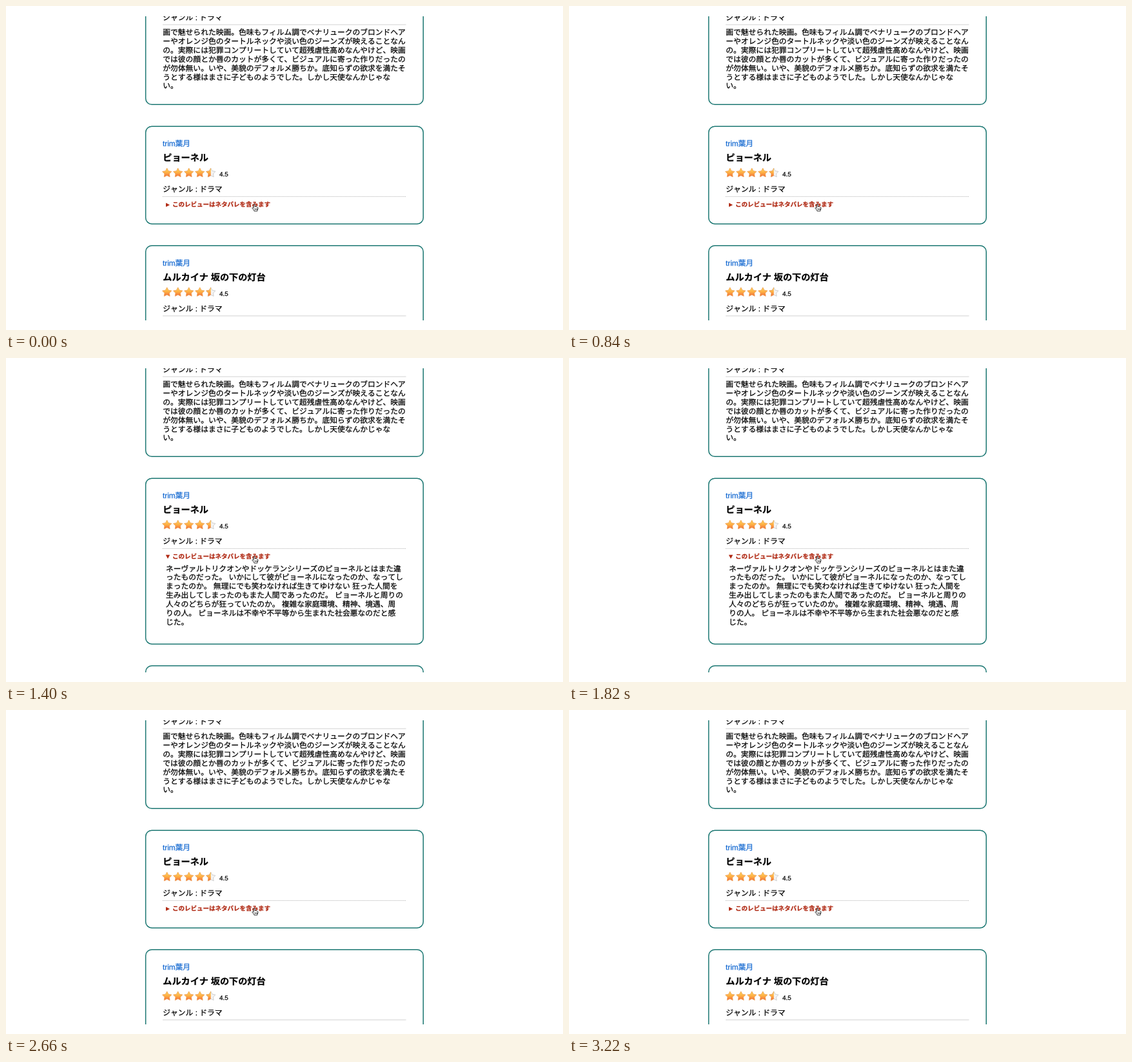
Write an HTML page that moves like this. It is 864 px wide and 504 px high and loops after 3360 ms.

```html
<!DOCTYPE html>
<html lang="ja">
<meta charset="utf-8">
<title>Review list</title>
<style>
  html, body { margin: 0; width: 100%; height: 100%; overflow: hidden; background: #fff; }
  svg { display: block; }
  text {
    font: 11.78px "Liberation Sans", "Noto Sans CJK JP", sans-serif;
    font-kerning: none; text-rendering: geometricPrecision; white-space: pre;
    color: #000; fill: currentColor; stroke: currentColor; stroke-width: .25;
  }
  .user { color: #1a6dd2; }
  .title { font-size: 14.13px; font-weight: 700; }
  .score { font-size: 9.8px; }
  .spoiler { font-size: 9.5px; font-weight: 700; color: #b02a14; }
  .frame { fill: #fff; stroke: #1b7772; stroke-width: 1.5; }
  .rule { stroke: #d2d2d2; }
  .dotted { stroke: #b4b4b4; stroke-dasharray: 1 1; }
</style>
<svg id="stage" width="864" height="504" viewBox="0 0 864 504"></svg>
<script>
const LINE = 13.83, STEP = 185.5, LOOP = 3360, OPEN = 1400, CLOSE = 2660, GROWTH = 106;
const CARD_HEIGHT = 151.6;

const firstReview = `画で魅せられた映画。色味もフィルム調でベナリュークのブロンドヘア
ーやオレンジ色のタートルネックや淡い色のジーンズが映えることなん
の。実際には犯罪コンプリートしていて超残虐性高めなんやけど、映画
では彼の顔とか唇のカットが多くて、ビジュアルに寄った作りだったの
が勿体無い。いや、美貌のデフォルメ勝ちか。底知らずの欲求を満たそ
うとする様はまさに子どものようでした。しかし天使なんかじゃな
い。`;
const hiddenReview = `ネーヴァルトリクオンやドッケランシリーズのピョーネルとはまた違
ったものだった。 いかにして彼がピョーネルになったのか、なってし
まったのか。 無理にでも笑わなければ生きてゆけない 狂った人間を
生み出してしまったのもまた人間であったのだ。 ピョーネルと周りの
人々のどちらが狂っていたのか。 複雑な家庭環境、精神、境遇、周
りの人。 ピョーネルは不幸や不平等から生まれた社会悪なのだと感
じた。`;

const text = (x, y, s, cls = '') => `<text x="${x}" y="${y}" class="${cls}">${s}</text>`;
const paragraph = (x, y, s) => s.split('\n').map((l, i) => text(x, y + i * LINE, l)).join('');
const frame = (y, h, id = '') =>
  `<rect id="${id}" class="frame" x="216.65" y="${y}" width="430.6" height="${h}" rx="9.5"/>`;
const genre = (y, cls = '') => text(243.3, y, 'ジャンル : ドラマ') +
  `<path class="rule ${cls}" d="M243 ${y + 7.1}H620.5"/>`;

const starPoints = Array.from({ length: 10 }, (_, i) => {
  const r = i % 2 ? 3.9 : 7.5, a = (i / 5 - 0.5) * Math.PI;
  return `${(r * Math.cos(a)).toFixed(2)},${(r * Math.sin(a)).toFixed(2)}`;
}).join(' ');
const star = (x, y, attrs) =>
  `<polygon points="${starPoints}" transform="translate(${x} ${y})" stroke-width=".8" stroke-linejoin="round" ${attrs}/>`;
const gold = 'fill="url(#gold)" stroke="#ee9a4c"';

function stars(y) {
  let s = '';
  for (let i = 0; i < 4; i++) s += star(249.7 + i * 17, y, gold);
  return s + star(317.7, y, 'fill="#f4f4f4" stroke="#c4c4c4"') +
    star(317.7, y, gold + ' clip-path="url(#half)"');
}

const header = (y, title) => text(243, y + 31.2, 'trim葉月', 'user') +
  text(243.3, y + 54, title, 'title') + stars(y + 72.8) + text(331, y + 78, '4.5', 'score');

const stage = document.getElementById('stage');
stage.innerHTML = `
  <defs>
    <linearGradient id="gold" x2="0" y2="1">
      <stop offset=".15" stop-color="#ffcf55"/><stop offset=".55" stop-color="#fdaa42"/>
      <stop offset="1" stop-color="#f0683c"/>
    </linearGradient>
    <clipPath id="half"><rect x="-9" y="-9" width="9" height="18"/></clipPath>
    <clipPath id="view"><rect y="16" width="864" height="473"/></clipPath>
  </defs>
  <g clip-path="url(#view)">
    ${frame(-60, 213.3)}${genre(21.9)}${paragraph(243.3, 45.4, firstReview)}
    ${frame(187.3, CARD_HEIGHT, 'card')}${header(187, 'ピョーネル')}${genre(289.4, 'dotted')}
    <path id="marker" fill="#b02a14"/>
    ${text(257.9, 311.8, 'このレビューはネタバレを含みます', 'spoiler')}
    <g id="detail">${paragraph(248, 331.6, hiddenReview)}</g>
    <g id="next">
      ${frame(187.3 + STEP, 200)}${header(187 + STEP, 'ムルカイナ 坂の下の灯台')}${genre(289.4 + STEP)}
      ${text(243.3, 498.6, '家族と町の物語がとても丁寧に描かれていて、最後まで飽きずに観た。')}
    </g>
    <path fill="#fff" stroke="#222" stroke-width=".9" stroke-linejoin="round"
      d="M384.3 314.5V309.3q0-1 .9-1t.9 1V312q1.2-.5 1.7.4 1.1-.4 1.6.5 1.5-.2 1.5 1.2
         v1.7l-1 2.1v1.1h-5.1v-1.1l-2.6-3q-.8-1.2.2-1.5 .7-.1 1.9 1.1z
         M386.2 315v2.2M387.9 315v2.2M389.5 315v2.2"/>
  </g>`;

const byId = id => document.getElementById(id);
const [card, marker, detail, next] = ['card', 'marker', 'detail', 'next'].map(byId);

function draw(now) {
  const t = now % LOOP, open = t >= OPEN && t < CLOSE, shift = open ? GROWTH : 0;
  card.setAttribute('height', CARD_HEIGHT + shift);
  next.setAttribute('transform', `translate(0 ${shift})`);
  detail.style.display = open ? '' : 'none';
  marker.setAttribute('d', open ? 'M247.8 306.3h6.4l-3.2 6z' : 'M248 306.2v6.4l6-3.2z');
}

const start = performance.now();
function tick() {
  draw(performance.now() - start);
  requestAnimationFrame(tick);
}
tick();
</script>
</html>
```
